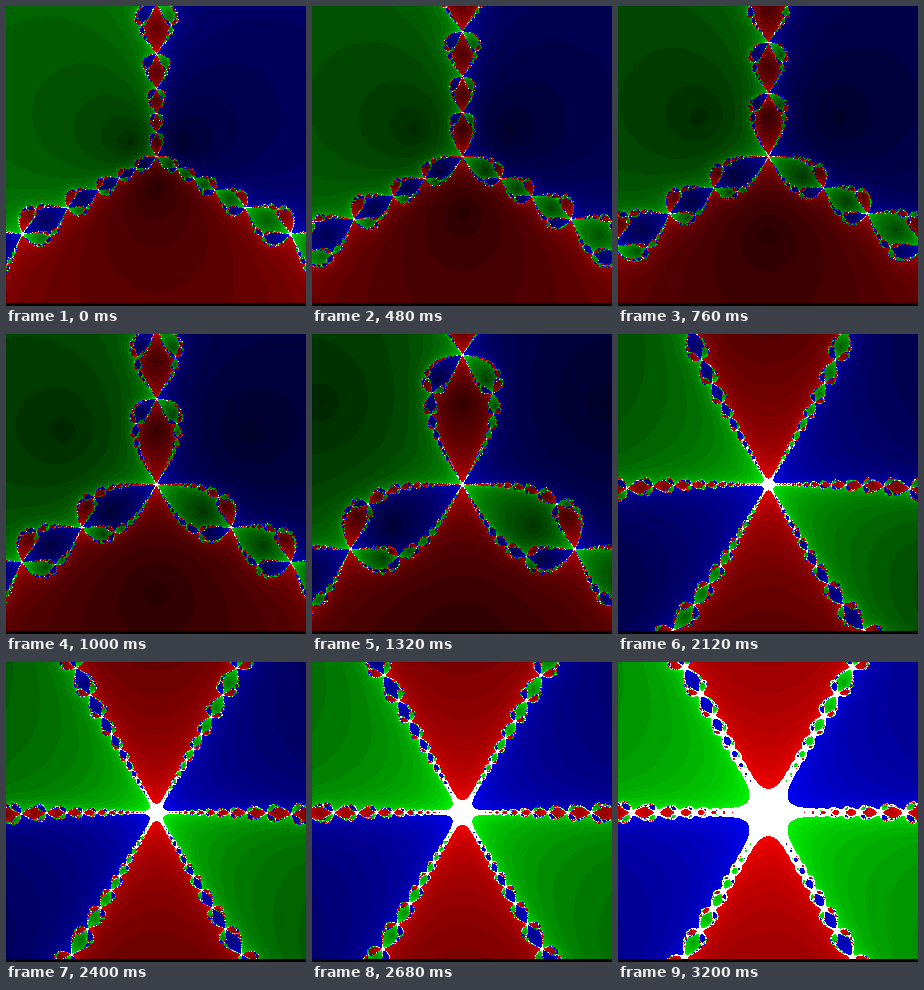
Animation, 300 px wide and 300 px high, one loop 3240 ms. Source, as an HTML page with a canvas:

```html
<!DOCTYPE html>
<html>
<head>
<meta charset="utf-8">
<title>Newton fractal zoom</title>
<style>
html, body { margin: 0; width: 100%; height: 100%; overflow: hidden; background: #000; }
canvas { display: block; }
</style>
</head>
<body>
<canvas id="stage" width="300" height="300"></canvas>
<script>
const SIZE = 300, ROWS = 297, STEP = 40, STEPS = 81;
const MAX_ITER = 21, TOLERANCE = 0.0135 ** 2;
const ctx = document.getElementById('stage').getContext('2d');
const image = ctx.createImageData(SIZE, SIZE);
const pixels = new Uint32Array(image.data.buffer).fill(0xff000000);

// Cube roots of -i with y pointing down: red below, green left, blue right.
const H = Math.sqrt(3) / 2;
const rootX = [0, -H, H], rootY = [1, -0.5, -0.5];

function colorAt(x, y) {
  for (let k = 0; k <= MAX_ITER; k++) {
    for (let r = 0; r < 3; r++) {
      const dx = x - rootX[r], dy = y - rootY[r];
      if (dx * dx + dy * dy < TOLERANCE) {
        return (0xff000000 | (30 + 10 * k) << (8 * r)) >>> 0;
      }
    }
    // z -> (2z - i / z^2) / 3
    const a = x * x - y * y, b = 2 * x * y, d = a * a + b * b;
    x = (2 * x - b / d) / 3;
    y = (2 * y - a / d) / 3;
  }
  return 0xffffffff;
}

function draw(step) {
  const unit = 30 / 0.95 ** step;
  for (let y = 0, i = 0; y < ROWS; y++) {
    for (let x = 0; x < SIZE; x++) {
      pixels[i++] = colorAt((x - SIZE / 2) / unit, (y - SIZE / 2) / unit);
    }
  }
  ctx.putImageData(image, 0, 0);
}

let shown = -1;
function tick() {
  const step = Math.floor(performance.now() / STEP) % STEPS;
  if (step !== shown) draw(shown = step);
  requestAnimationFrame(tick);
}
tick();
</script>
</body>
</html>
```
